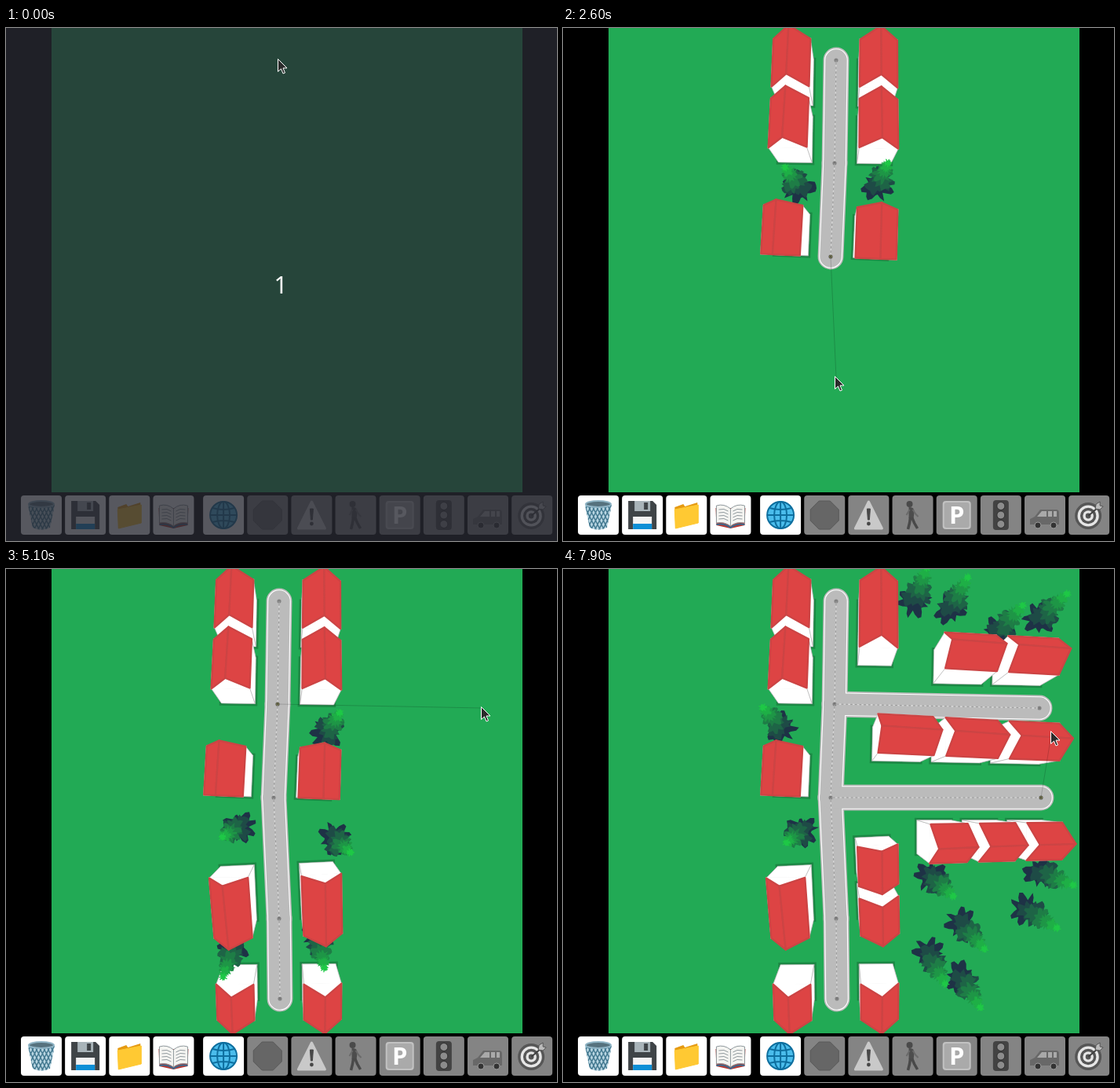
These frames come from a looping animation (702 px wide and 653 px high, 8 s). An HTML page with a canvas:

```html
<!DOCTYPE html>
<html lang="en">
<head>
<meta charset="utf-8">
<title>Road editor</title>
<style>
  html, body { margin: 0; width: 100%; height: 100%; overflow: hidden; background: #000; }
  canvas, svg { position: absolute; left: 0; top: 0; display: block; }
  text { font-family: "Noto Sans", sans-serif; text-anchor: middle; }
</style>
</head>
<body>
<canvas id="world" width="702" height="653"></canvas>
<svg width="702" height="653" viewBox="0 0 702 653">
  <defs>
    <clipPath id="bin"><path d="M-17-13Q0-7 17-13L11 16Q0 21-11 16Z"/></clipPath>
  </defs>
  <g id="bar"></g>
  <g id="dim">
    <rect width="702" height="653" fill="#282a33" fill-opacity=".78"/>
    <text x="350" y="337.5" font-size="30" fill="#fff">1</text>
  </g>
  <path id="cursor" d="M0 0V16L4 12.500L6.500 18.500L9 17.500L6.500 11.500H11.500Z"
    fill="#2b2b2b" stroke="#fff" stroke-linejoin="round"/>
</svg>
<script>
const $ = id => document.getElementById(id);
const ctx = $("world").getContext("2d");
const LOOP = 8000, STEP = 100;
const K = 1 / 3.5;         // pixels per world unit
const VIEW = [358, 291];   // camera centre
const ROAD = 100 * K, WIDTH = 150 * K, MIN = 150 * K, SPACE = 50 * K, TREE = 160 * K;
const GUIDE = (ROAD + WIDTH) / 2 + SPACE;

// ---- toolbar ----
const range = (n, f) => Array.from({ length: n }, (_, i) => f(i));
const mesh = range(17, i => `M${i * 5 - 40}-16l18 36m0-36l-18 36`).join("");
const rings = range(5, i => `<circle cx="-1" cy="1" r="${17 - 3.4 * i}" fill="${i % 2 ? "#e6e6e6" : "#565656"}"/>`).join("");
const lamps = range(3, i => `<circle cy="${11.5 * (i - 1)}" r="5" fill="#8c8c8c" stroke="#303030"/>`).join("");
const icons = [
  // bin
  `<g clip-path="url(#bin)"><rect x="-18" y="-16" width="36" height="38" fill="#b9d6e2"/>
   <path d="${mesh}" stroke="#467b92" stroke-width="1.5" fill="none"/></g>
   <ellipse cy="-14" rx="16" ry="4" fill="#56727e" stroke="#8fb4c5" stroke-width="2"/>`,
  // disk
  `<path d="M-18-18H13L18-13V18H-18Z" fill="#3f4447"/>
   <path d="M-10-18H10V-5H-10Z" fill="#a9b4b9"/><path d="M2-16H7V-7H2Z" fill="#3f4447"/>
   <path d="M-12 2H12V18H-12Z" fill="#f3f3f3"/><path d="M-12 11H12V18H-12Z" fill="#0c8fd6"/>`,
  // folder
  `<path d="M-15-10L-4-14L-2-11L14-16V9L-14 16Z" fill="#e59a12"/>
   <path d="M-15-7L15-13V10L-14 17Z" fill="#ffc933" stroke="#ffc933" stroke-linejoin="round"/>`,
  // book
  `<path d="M-19-9L-18 13L0 17L18 13L19-9Z" fill="#b03a35"/>
   <path d="M-18-12Q-8-15 0-8Q8-15 18-12V10Q7 8 0 14Q-8 8-18 10Z" fill="#f5f5f2" stroke="#8f989c"/>
   <path d="M0-8V14M-15-7Q-8-9-3-5m-12 2q7-2 12 2m-12 2q7-2 12 2m-12 2q7-2 12 2M15-7Q8-9 3-5m12 2q-7-2-12 2m12 2q-7-2-12 2m12 2q-7-2-12 2" fill="none" stroke="#8f989c"/>
   <path d="M-18 12Q-8 10 0 16Q8 10 18 12" fill="none" stroke="#2272a0" stroke-width="1.5"/>`,
  // globe
  `<g fill="none" stroke="#0e6f9f" stroke-width="2"><circle r="17" fill="#4bbdec"/><ellipse rx="8" ry="17"/>
   <path d="M0-17V17M-17 0H17M-14-9Q0-5 14-9M-14 9Q0 5 14 9"/></g>`,
  // octagon
  `<path d="M-7-18H7L18-7V7L7 18H-7L-18 7V-7Z" fill="#666" stroke="#585858"/>`,
  // warning
  `<path d="M0-17L17 17H-17Z" fill="#c9c9c9" stroke="#c9c9c9" stroke-width="3" stroke-linejoin="round"/>
   <path d="M-2-8H2L1 6H-1Z" fill="#484848" stroke="#484848"/><circle cy="11" r="2.400" fill="#484848"/>`,
  // walker
  `<circle cx="-4" cy="-14" r="4" fill="#4a4a4a"/><path d="M-5-10Q2-11 2-4L1 4H-5Z" fill="#4d4d4d"/>
   <path d="M-3 3L-4 10L-6 18M-1 3L2 10L6 17" fill="none" stroke="#494949" stroke-width="3.500"/>
   <path d="M-4-7L-8 0M0-7L4-1L7 2" fill="none" stroke="#6a6a6a" stroke-width="2"/>`,
  // parking
  `<rect x="-18" y="-18" width="36" height="36" rx="4" fill="#c2c2c2"/>
   <rect x="-16" y="-16" width="32" height="32" rx="3" fill="#aaa"/>
   <text y="11" font-size="31" font-weight="700" fill="#fff">P</text>`,
  // signal
  `<rect x="-10" y="-19" width="20" height="38" rx="4" fill="#434343"/>${lamps}`,
  // car
  `<path d="M-19 12V5L-13 2L-6-7H14Q18-7 18-3V12Z" fill="#686868"/>
   <path d="M-10 2L-4-5H2V2ZM4-5H9V2H4ZM11-5H15V2H11Z" fill="#a9a9a9"/>
   <g fill="#333" stroke="#999"><circle cx="-9" cy="13" r="4"/><circle cx="11" cy="13" r="4"/></g>`,
  // dart board
  `${rings}<path d="M-1 1L12-10" stroke="#3f3f3f" stroke-width="2"/>
   <path d="M8-8L9-14L14-17V-12L18-11L14-7Z" fill="#bbb" stroke="#555"/>`
];
$("bar").innerHTML = icons.map((icon, i) => {
  const x = 45 + 56.15 * i + (i < 4 ? 0 : 7.5);
  return `<g transform="translate(${x} 620)"><rect x="-26" y="-25" width="52" height="50" rx="4" fill="${i < 5 ? "#fff" : "#848484"}"/>${icon}</g>`;
}).join("");

// ---- script of the session ----
const A = [348, 41], B = [346, 172], C = [341, 291], D = [348, 445],
      E = [349, 547], F = [607, 177], G = [609, 291];
// clicks: time, selected point
const clicks = [[0, null], [500, A], [1500, B], [1900, C], [2700, D], [3200, E], [3500, null],
                [4500, B], [5200, F], [5500, null], [6700, C], [7600, G]];
// mouse moves: start, end, goal
const moves = [[500, 1300, B], [1500, 1900, C], [1900, 2500, D], [2700, 3100, E], [3500, 3900, [354, 144]],
               [3900, 4200, B], [4500, 5100, F], [5500, 6100, [341, 299]], [6400, 6700, C],
               [6700, 7500, G], [7600, 7900, [622.5, 208]]];
// a click that follows another selection builds a road
const roads = clicks.map(([t, p], i) => ({ t, ends: [i && clicks[i - 1][1], p] }))
  .filter(r => r.ends[0] && r.ends[1]);

// ---- geometry ----
const mix = (a, b, t) => a + (b - a) * t;
const lerp = (p, q, t) => [mix(p[0], q[0], t), mix(p[1], q[1], t)];
const gap = (p, q) => Math.hypot(p[0] - q[0], p[1] - q[1]);
const normal = (p, q) => [(q[1] - p[1]) / gap(p, q), (p[0] - q[0]) / gap(p, q)];
const shift = (p, n, s) => [p[0] + n[0] * s, p[1] + n[1] * s];

function segDist(v, [p, q]) {
  const dx = q[0] - p[0], dy = q[1] - p[1];
  const t = ((v[0] - p[0]) * dx + (v[1] - p[1]) * dy) / (dx * dx + dy * dy || 1);
  return gap(v, lerp(p, q, Math.max(0, Math.min(1, t))));
}
const polyDist = (v, poly) => Math.min(...poly.map((p, i) => segDist(v, [p, poly[(i + 1) % poly.length]])));
const farFirst = polys => polys.sort((a, b) => polyDist(VIEW, b) - polyDist(VIEW, a));

// clearance of two boxes along their own axes
function clearance(a, b) {
  const axes = [a, b].flatMap(p => [normal(p[0], p[1]), normal(p[1], p[2])]);
  return Math.max(...axes.map(n => {
    const [u, v] = [a, b].map(poly => poly.map(p => p[0] * n[0] + p[1] * n[1]));
    return Math.max(Math.min(...u) - Math.max(...v), Math.min(...v) - Math.max(...u));
  }));
}

// push a point away from the camera to fake height
function lift(p, h) {
  const d = gap(p, VIEW) || 1;
  return lerp(VIEW, p, 1 + h * K * Math.atan(d / K / 300) / (Math.PI / 2) / d);
}

function fillPoly(poly, fill, stroke, width) {
  ctx.beginPath();
  poly.forEach(p => ctx.lineTo(...p));
  ctx.closePath();
  ctx.fillStyle = fill;
  ctx.fill();
  if (!stroke) return;
  ctx.strokeStyle = stroke;
  ctx.lineWidth = width * K;
  ctx.stroke();
}

// ---- houses and trees ----
function house(p, q) {
  const n = normal(p, q), h = WIDTH / 2;
  const base = [shift(p, n, h), shift(p, n, -h), shift(q, n, -h), shift(q, n, h)];
  const draw = () => {
    const top = base.map(v => lift(v, 120));
    const r0 = lift(p, 200), r1 = lift(q, 200);
    const walls = base.map((v, i) => [v, base[(i + 1) % 4], top[(i + 1) % 4], top[i]]);
    ctx.lineJoin = "miter";
    fillPoly(base, "#fff", "rgba(0,0,0,.2)", 20);
    farFirst(walls).forEach(w => fillPoly(w, "#fff", "#aaa", 2));
    fillPoly(top, "#fff", "#fff", 6);
    ctx.lineJoin = "round";
    farFirst([[top[0], top[3], r1, r0], [top[2], top[1], r0, r1]])
      .forEach(r => fillPoly(r, "#d44", "#c44", 8));
  };
  const near = v => Math.min(polyDist(v, base), segDist(v, [p, q]));
  return { base, near, draw };
}

function tree(c) {
  const top = lift(c, 200);
  const level = (o, size) => range(32, i => {
    const a = i * Math.PI / 16;
    const r = size / 2 * K * mix(0.5, 1, Math.cos(((a + c[0] / K) * size) % 17) ** 2);
    return shift(o, [Math.cos(a), Math.sin(a)], r);
  });
  const draw = () => {
    for (let t = 0; t < 1.01; t += 1 / 6)
      fillPoly(level(lerp(c, top, t), mix(160, 40, t)), `rgb(30,${Math.round(mix(50, 200, t))},70)`);
  };
  return { c, base: level(c, 160), draw };
}

// fill the free stretch on both sides of every road
function buildHouses(segs) {
  const list = [];
  for (const seg of segs) for (const side of [1, -1]) {
    const [p, q] = seg, n = normal(p, q), len = gap(p, q);
    const at = t => shift(lerp(p, q, t), n, side * GUIDE);
    const free = range(401, i => i / 400)
      .filter(t => segs.every(s => s === seg || segDist(at(t), s) > GUIDE - 0.1));
    const from = free[0], span = (free[free.length - 1] - from) * len;
    if (!(span >= MIN)) continue;
    const count = Math.floor((span + SPACE) / (MIN + SPACE));
    const part = (span + SPACE) / count;
    for (let i = 0; i < count; i++) {
      const h = house(at(from + i * part / len), at(from + ((i + 1) * part - SPACE) / len));
      if (list.every(o => clearance(o.base, h.base) > SPACE - 0.1)) list.push(h);
    }
  }
  return list;
}

function randomizer(seed) {
  return () => {
    seed = (seed + 0x6d2b79f5) | 0;
    let r = Math.imul(seed ^ (seed >>> 15), 1 | seed);
    r = (r + Math.imul(r ^ (r >>> 7), 61 | r)) ^ r;
    return ((r ^ (r >>> 14)) >>> 0) / 4294967296;
  };
}

// scatter trees near houses and roads until no place is found
function plantTrees(segs, houses, seed) {
  const list = [], rand = randomizer(seed);
  const pts = [...segs.flat(), ...houses.flatMap(h => h.base)];
  const [xs, ys] = [0, 1].map(i => pts.map(p => p[i]));
  for (let miss = 0; pts.length && miss < 100; miss++) {
    const c = [mix(Math.min(...xs), Math.max(...xs), rand()), mix(Math.min(...ys), Math.max(...ys), rand())];
    const d = Math.min(...houses.map(h => h.near(c)), ...segs.map(s => segDist(c, s) - ROAD / 2));
    if (d < TREE / 2 || d > TREE * 2 || list.some(o => gap(o.c, c) < TREE)) continue;
    list.push(tree(c));
    miss = 0;
  }
  return list;
}

const scenes = range(roads.length + 1, n => {
  const segs = roads.slice(0, n).map(r => r.ends);
  const houses = buildHouses(segs);
  return [...houses, ...plantTrees(segs, houses, n)]
    .sort((a, b) => polyDist(VIEW, b.base) - polyDist(VIEW, a.base));
});

// ---- drawing ----
function lines(list, color, width, dash = []) {
  ctx.strokeStyle = color;
  ctx.lineWidth = width * K;
  ctx.setLineDash(dash.map(v => v * K));
  ctx.lineCap = dash.length ? "butt" : "round";
  for (const [p, q] of list) {
    ctx.beginPath();
    ctx.moveTo(...p);
    ctx.lineTo(...q);
    ctx.stroke();
  }
  ctx.setLineDash([]);
}
function disc([x, y], r, color, ring) {
  ctx.beginPath();
  ctx.arc(x, y, r * K, 0, 7);
  ctx.fillStyle = ctx.strokeStyle = color;
  ctx.lineWidth = 2 * K;
  ring ? ctx.stroke() : ctx.fill();
}
function mouseAt(t) {
  let pos = A;
  for (const [t0, t1, goal] of moves) {
    const u = Math.max(0, Math.min(1, (t - t0) / (t1 - t0)));
    pos = lerp(pos, goal, u * u * (3 - 2 * u));
  }
  return pos;
}

function render(t) {
  const mouse = mouseAt(t);
  const built = roads.filter(r => r.t <= t).map(r => r.ends);
  const pick = clicks.filter(c => c[0] <= t).pop()[1];
  const dots = new Set(built.flat());
  if (pick) dots.add(pick);

  ctx.clearRect(0, 0, 702, 653);
  ctx.save();
  ctx.beginPath();
  ctx.rect(58, 0, 600, 591);
  ctx.clip();
  ctx.fillStyle = "#2a5";
  ctx.fillRect(58, 0, 600, 591);

  lines(built, "#bbb", 115);
  lines(built, "#fff", 104);
  lines(built, "#bbb", 96);
  lines(built, "#fff", 4, [10, 10]);
  scenes[built.length].forEach(item => item.draw());

  ctx.globalAlpha = 0.3;
  lines(built, "#000", 2);
  dots.forEach(p => disc(p, 9, "#000"));
  const hover = [...dots].find(p => gap(p, mouse) < 9);
  if (hover) {
    disc(hover, 9, "#000");
    disc(hover, 3.6, "#ff0");
  }
  if (pick) {
    lines([[pick, hover || mouse]], "#000", 2);
    disc(pick, 9, "#000");
    disc(pick, 5.4, "#ff0", true);
  }
  ctx.restore();

  $("dim").style.display = t < 100 ? "" : "none";
  const [x, y] = mouse.map(v => Math.floor(v - 1.5) + 0.5);
  $("cursor").setAttribute("transform", `translate(${x} ${y})`);
}

const start = performance.now();
let shown = -1;
function tick() {
  const t = Math.floor((performance.now() - start) % LOOP / STEP) * STEP;
  if (t !== shown) render(shown = t);
  requestAnimationFrame(tick);
}
tick();
</script>
</body>
</html>
```
